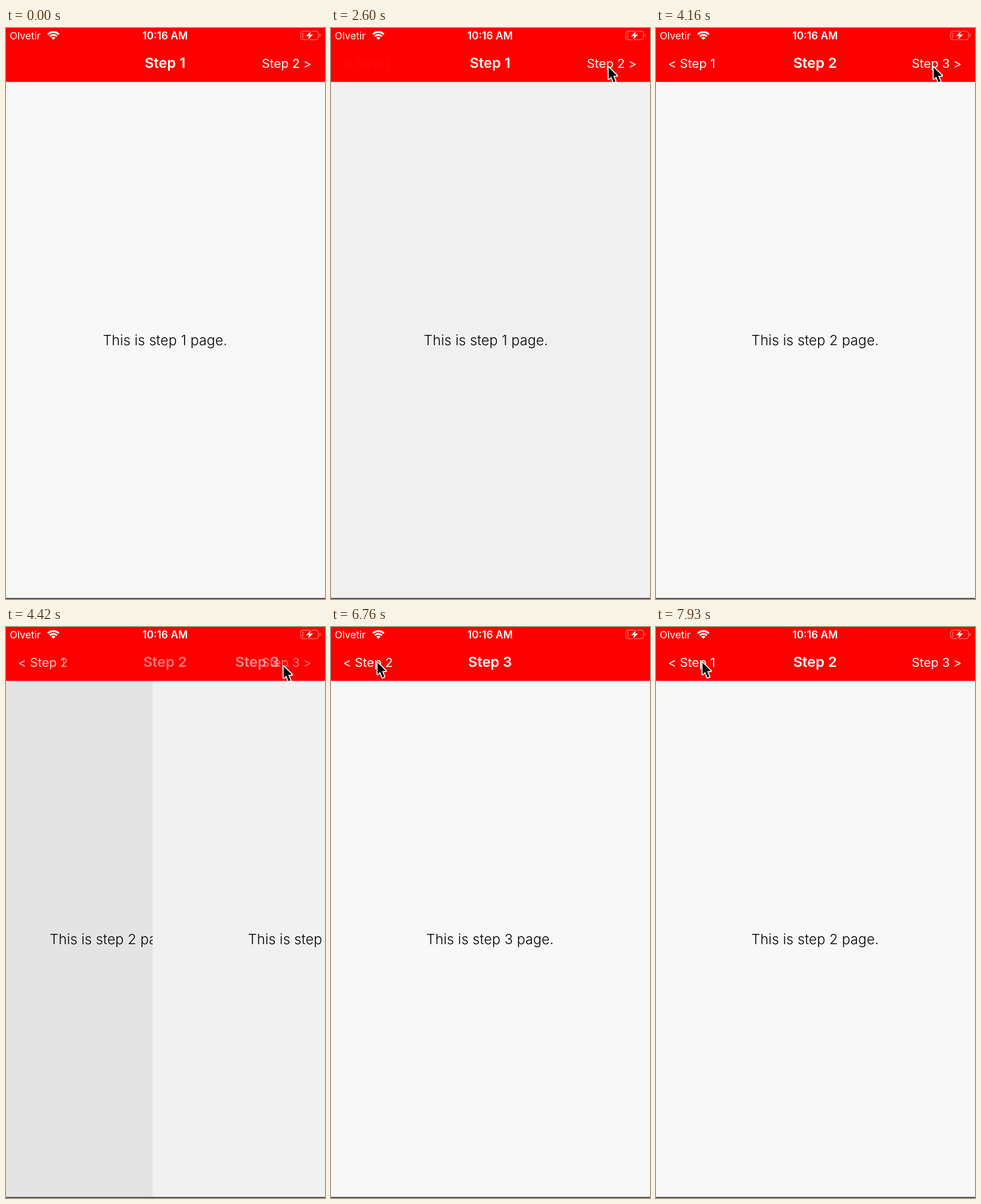
Write an HTML page with a canvas that moves like this. It is 559 by 1001 pixels and loops after 8000 ms.

```html
<!DOCTYPE html>
<html lang="en">
<head>
<meta charset="utf-8">
<title>Step navigation</title>
<style>
html, body { margin: 0; width: 100%; height: 100%; overflow: hidden; background: #f8f8f8; }
canvas { display: block; width: 559px; height: 1001px; }
</style>
</head>
<body>
<canvas id="stage" width="559" height="1001"></canvas>
<script>
const W = 559, H = 1001, BAR = 94.5, LOOP = 8000, TICK = 130;
const FONT = 'Inter, "Open Sans", sans-serif';
const RED = '#fe0000';
const SLIDE = 350, SETTLE = 300;   // page tint is restored just before the slide ends
const MID = 278.7;
const ctx = document.getElementById('stage').getContext('2d');

const moves = [
  { at: 2549, from: 1, to: 2 },
  { at: 4237, from: 2, to: 3 },
  { at: 6969, from: 3, to: 2 }
];

// Pointer tip: time, x, y
const path = [
  [1690, 585, 20], [1820, 548, 32], [1950, 510, 56], [2080, 486.5, 69],
  [4810, 486.5, 69], [5070, 481, 130], [5330, 476, 181], [5590, 447, 194],
  [5850, 325, 176], [6110, 165, 118], [6370, 81.5, 62.5]
];

const lerp = (a, b, k) => a + (b - a) * k;

function easeInOut(x) {
  if (x <= 0) return 0;
  if (x >= 1) return 1;
  let lo = 0, hi = 1;
  for (let i = 0; i < 24; i++) {
    const s = (lo + hi) / 2, r = 1 - s;
    if (1.26 * s * r * r + 1.74 * s * s * r + s * s * s < x) lo = s; else hi = s;
  }
  return lo * lo * (3 - 2 * lo);
}

function text(str, x, y, size, { weight = 400, align = 'center', color = '#fff', alpha = 1, gap = 0 } = {}) {
  if (alpha <= 0) return;
  ctx.globalAlpha = alpha;
  ctx.font = `${weight} ${size}px ${FONT}`;
  ctx.letterSpacing = gap + 'px';
  ctx.textAlign = align;
  ctx.fillStyle = color;
  ctx.fillText(str, x, y);
  ctx.globalAlpha = 1;
}

function page(step, x, shade, right = W) {
  const left = Math.max(0, x);
  ctx.save();
  ctx.beginPath();
  ctx.rect(left, 0, right - left, H);
  ctx.clip();
  const g = Math.round(shade);
  ctx.fillStyle = `rgb(${g},${g},${g})`;
  ctx.fillRect(0, 0, W, H);
  text(`This is step ${step} page.`, MID + x, 556, 24.4, { weight: 300, color: '#000', gap: 0.1 });
  ctx.restore();
}

function navItems(step, alpha, shift) {
  text(`Step ${step}`, MID + shift, 70, 24.8, { weight: 600, alpha });
  if (step > 1) text(`< Step ${step - 1}`, 21, 70, 22, { align: 'left', alpha, gap: -0.05 });
  if (step < 3) text(`Step ${step + 1} >`, 535.5, 70, 22, { align: 'right', alpha, gap: -0.05 });
}

function wifi(x, y) {
  const a = -Math.PI * 0.75, b = -Math.PI * 0.25;
  ctx.strokeStyle = ctx.fillStyle = '#fff';
  ctx.lineWidth = 3.2;
  for (const r of [13.6, 8.6]) {
    ctx.beginPath();
    ctx.arc(x, y, r, a, b);
    ctx.stroke();
  }
  ctx.beginPath();
  ctx.moveTo(x, y);
  ctx.arc(x, y, 5.2, a, b);
  ctx.fill();
}

function polygon(points) {
  ctx.beginPath();
  points.forEach(([x, y]) => ctx.lineTo(x, y));
  ctx.closePath();
}

function battery() {
  ctx.globalAlpha = 0.42;
  ctx.strokeStyle = ctx.fillStyle = '#fff';
  ctx.lineWidth = 1.4;
  ctx.beginPath();
  ctx.roundRect(516.5, 5.5, 31, 15, 4);
  ctx.stroke();
  ctx.fillRect(519.5, 8, 1.5, 10);
  ctx.fillRect(549.5, 10.5, 1.7, 5);
  ctx.globalAlpha = 1;
  polygon([[534.5, 5.5], [526, 14.2], [531.4, 14.2], [529, 20.5], [538, 11.6], [532.6, 11.6]]);
  ctx.lineWidth = 2.5;
  ctx.strokeStyle = RED;
  ctx.stroke();
  ctx.fill();
}

function statusBar() {
  text('Olvetir', 6.5, 20, 17.6, { align: 'left' });
  wifi(83, 20.8);
  text('10:16 AM', MID, 20, 18.2, { weight: 600 });
  battery();
}

function pointer(t) {
  if (t < path[0][0]) return;
  const i = path.findIndex(p => p[0] > t);
  let [, x, y] = path[path.length - 1];
  if (i > 0) {
    const [t0, x0, y0] = path[i - 1], [t1, x1, y1] = path[i];
    const k = (t - t0) / (t1 - t0);
    x = lerp(x0, x1, k);
    y = lerp(y0, y1, k);
  }
  ctx.save();
  ctx.translate(x, y);
  polygon([[0, 0], [0, 20.5], [4.6, 16.2], [8.6, 26], [12, 24.6], [8, 15], [14.6, 14.6]]);
  ctx.lineWidth = 3.6;
  ctx.lineJoin = 'round';
  ctx.strokeStyle = '#fff';
  ctx.stroke();
  ctx.fillStyle = '#000';
  ctx.fill();
  ctx.restore();
}

function draw(t) {
  const past = moves.filter(m => t >= m.at);
  const move = past[past.length - 1];
  const step = move ? move.to : 1;
  const age = move ? t - move.at : SLIDE;
  const sliding = age < SLIDE;
  const p = easeInOut(age / SLIDE);
  const push = sliding && move.to > move.from;
  const cover = push ? p : 1 - p;   // how far the upper page covers the lower one

  if (sliding) {
    const late = age > SETTLE;
    const base = late ? 248 : 241;
    const edge = Math.round(W * (1 - cover));
    const [low, high] = push ? [move.from, move.to] : [move.to, move.from];
    page(low, -0.3 * W * cover, late ? base : base * (1 - 0.1 * cover));
    page(high, edge, base);
  } else {
    page(step, 0, 248);
  }

  ctx.fillStyle = RED;
  ctx.fillRect(0, 0, W, BAR);
  if (sliding) {
    const shift = 516 * Math.pow(1 - cover, 1.5);
    navItems(move.from, 1 - p, push ? 0 : shift);
    navItems(move.to, p, push ? shift : 0);
  } else {
    navItems(step, 1, 0);
  }
  statusBar();

  ctx.fillStyle = '#555';
  ctx.fillRect(0, 999, W, 2);
  pointer(t);
}

function frame() {
  const t = performance.now() % LOOP;
  draw(Math.floor(t / TICK) * TICK);
  requestAnimationFrame(frame);
}
frame();
</script>
</body>
</html>
```
